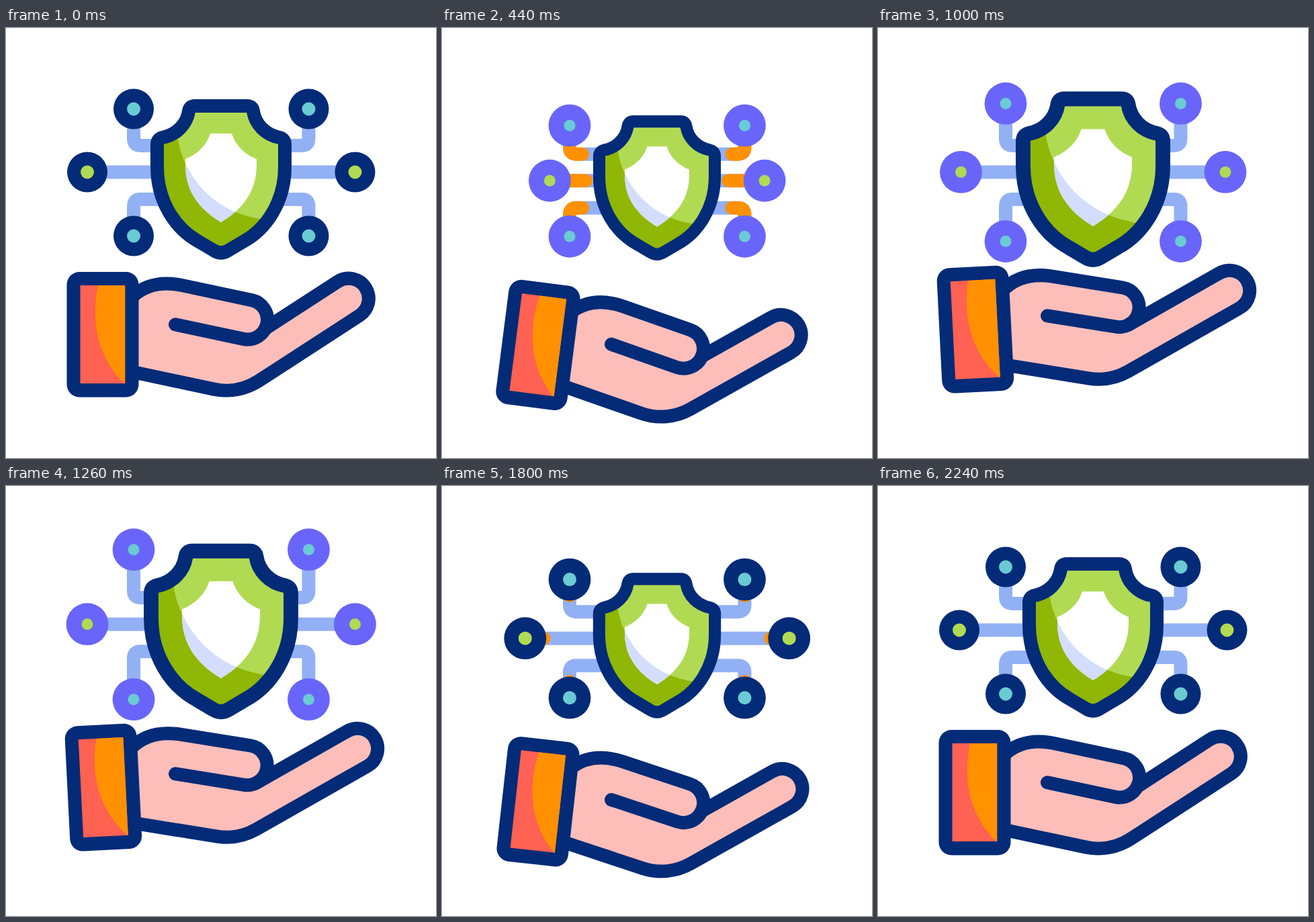
An HTML page that plays this animation: 640 px wide and 640 px high, repeating every 2.44 s.

```html
<!DOCTYPE html>
<html lang="en">
<head>
<meta charset="utf-8">
<title>Protected network</title>
<style>
  html, body { margin: 0; width: 100%; height: 100%; overflow: hidden; background: #fff; }
  svg { display: block; width: 100%; height: 100%; }
  .line { fill: none; stroke: #032b77; stroke-width: 20; stroke-linecap: round; stroke-linejoin: round; }
  .wire { fill: none; stroke: #92b0f4; stroke-width: 20; }
  .pulse { fill: none; stroke: #ff9100; stroke-width: 20; stroke-linecap: round; }
</style>
</head>
<body>
<svg viewBox="0 0 640 640">
  <defs>
    <path id="body" d="M281 116H359Q367 116 368 124C371 143 386 159 407 163Q415 165 415 173V207C415 258 388 299 353 318L331 331Q320 338 309 331L287 318C252 299 225 258 225 207V173Q225 165 233 163C254 159 269 143 272 124Q273 116 281 116Z"/>
    <path id="core" d="M304 157H336C341 174 355 188 373 195V204C373 245 350 271 320 289C290 271 267 245 267 204V195C285 188 299 174 304 157Z"/>
    <path id="shade" d="M255 160C262 215 305 276 385 285V345H200V160Z"/>
    <clipPath id="inBody"><use href="#body"/></clipPath>
    <clipPath id="inCore"><use href="#core"/></clipPath>
  </defs>
  <g id="net">
    <g id="side"></g>
    <use href="#side" transform="translate(640.5 0) scale(-1 1)"/>
    <g id="shield">
      <use href="#body" fill="#b1da53"/>
      <use href="#shade" fill="#90b606" clip-path="url(#inBody)"/>
      <use href="#core" fill="#fff"/>
      <use href="#shade" fill="#d3ddfd" clip-path="url(#inCore)"/>
      <use href="#body" class="line"/>
    </g>
  </g>
  <g id="hand">
    <path id="skin" fill="#fdbeba"/>
    <path id="finger" class="line"/>
    <path id="thumb" class="line"/>
    <rect x="90.5" y="363" width="107" height="186.5" rx="19" fill="#032b77"/>
    <path d="M110.5 383H177.2V529H110.5Z" fill="#ff6152"/>
    <path d="M137 383C128 425 130 485 176 529H177.2V383Z" fill="#ff9100"/>
  </g>
</svg>
<script>
const LOOP = 2440, SECOND_PULSE = 1255;
const el = id => document.getElementById(id);
const clamp = u => Math.min(1, Math.max(0, u));
const mix = (a, b, u) => a + (b - a) * u;
const ramp = (t, from, to) => clamp((t - from) / (to - from));

// Rest, dip, lift, hold, dip again, rest: sine easing between the six times.
function swing(times, dip, lift, rest = 0) {
  const poses = [rest, dip, lift, lift, dip, rest];
  return t => {
    const next = times.findIndex(at => at > t);
    if (next < 0) return rest;
    const u = ramp(t, times[next - 1], times[next]);
    return mix(poses[next - 1], poses[next], (1 - Math.cos(Math.PI * u)) / 2);
  };
}

const handTimes = [0, 450, 970, 1250, 1935, 2160];
const handY = swing(handTimes, 29.5, -13);
const handTurn = swing(handTimes, 7.3, -2.9);
const fingerTurn = swing(handTimes, -3.6, 6.3);
const netY = swing([0, 460, 1540, 1540, 1830, 2160], 12.8, -12.8);
const shieldSize = swing([0, 450, 1000, 1500, 1820, 2160], .905, 1.095, 1);
const sideX = swing([0, 480, 1100, 1350, 1610, 1840], 40, 0);
const cornerY = swing([0, 470, 1330, 1330, 1620, 2000], 12, -17.5);

function set(node, attrs) {
  for (const name in attrs) node.setAttribute(name, attrs[name]);
}
function add(tag, attrs) {
  const node = document.createElementNS('http://www.w3.org/2000/svg', tag);
  set(node, attrs);
  return el('side').appendChild(node);
}

const links = ['top', 'mid', 'bottom'].map(kind => ({
  kind,
  wire: add('path', { class: 'wire' }),
  pulse: add('path', { class: 'pulse', pathLength: 100 }),
  ring: add('circle', {}),
  dot: add('circle', { fill: kind === 'mid' ? '#b1da53' : '#6acbd3' })
}));

// Each wire runs from its node to the shield.
function route(kind, t) {
  if (kind === 'mid') {
    const x = 121 + sideX(t);
    return { x, y: 214.5, d: `M${x} 214.5H290` };
  }
  const dir = kind === 'top' ? 1 : -1;
  const y = 215 - dir * (94.5 - cornerY(t));
  const bend = 215 - dir * 40;
  return { x: 190, y, d: `M190 ${y}V${bend - dir * 10}Q190 ${bend} 200 ${bend}H290` };
}

function drawNet(t) {
  set(el('net'), { transform: `translate(0 ${netY(t)})` });
  set(el('shield'), { transform: `translate(320 225.5) scale(${shieldSize(t)}) translate(-320 -225.5)` });

  // A pulse runs into the nodes and flips their colour, twice per loop.
  const second = t >= SECOND_PULSE;
  const age = second ? t - SECOND_PULSE : t;
  const head = 100 - 100 * ramp(age, 140, 300);
  const tail = 100 - 100 * ramp(age, 196, 616);
  const flip = ramp(age, 330, 430);
  const tint = second ? 1 - flip : flip;
  const fill = `rgb(${mix(3, 105, tint)}, ${mix(43, 101, tint)}, ${mix(119, 250, tint)})`;
  const r = 30 + 1.4 * (ramp(t, 200, 400) - ramp(t, 1800, 2240));

  for (const { kind, wire, pulse, ring, dot } of links) {
    const { x, y, d } = route(kind, t);
    set(wire, { d });
    set(pulse, {
      d,
      visibility: tail > head ? 'visible' : 'hidden',
      'stroke-dasharray': `${Math.max(0, tail - head)} 999`,
      'stroke-dashoffset': -head
    });
    set(ring, { cx: x, cy: y, r, fill });
    set(dot, { cx: x, cy: y, r: 10 - 1.5 * tint });
  }
}

const heel = { x: 328, y: 451, r: 88.5 };
const thumb = { x: 359.5, y: 434, r: 29.5 };
const tipR = 30;
const thumbTop = 'M188 400C205 384 228 376 262 383L365.7 405.1A29.5 29.5 0 0 1 353.4 462.9';
set(el('thumb'), { d: thumbTop + 'L252 441.3' });

// The finger leaves the round heel of the palm as a tangent.
function fingerPath(turn) {
  const lean = (33 - turn) * Math.PI / 180;
  const ax = Math.cos(lean), ay = -Math.sin(lean);
  const nx = -ay, ny = ax;
  const reach = 178.8 + 1.9 * turn;
  const at = (along, out) => [heel.x + ax * along + nx * out, heel.y + ay * along + ny * out];
  const out = heel.r - tipR;

  // Where the upper edge meets the thumb's arc.
  const dx = thumb.x - heel.x, dy = thumb.y - heel.y;
  const gap = dx * nx + dy * ny - (out - tipR);
  const join = dx * ax + dy * ay + Math.sqrt(Math.max(0, thumb.r ** 2 - gap ** 2));

  return `${at(join, out - tipR)}L${at(reach, out - tipR)}A${tipR} ${tipR} 0 0 1 ${at(reach, heel.r)}`
    + `L${at(0, heel.r)}A${heel.r} ${heel.r} 0 0 1 309.6 537.6L188 511.8`;
}

function drawHand(t) {
  set(el('hand'), { transform: `translate(0 ${handY(t)}) rotate(${handTurn(t)} 252 441)` });
  const outline = fingerPath(fingerTurn(t));
  set(el('finger'), { d: 'M' + outline });
  set(el('skin'), { d: thumbTop + 'L' + outline + 'Z' });
}

const start = performance.now();
function tick() {
  const t = (performance.now() - start) % LOOP;
  drawNet(t);
  drawHand(t);
  requestAnimationFrame(tick);
}
tick();
</script>
</body>
</html>
```
